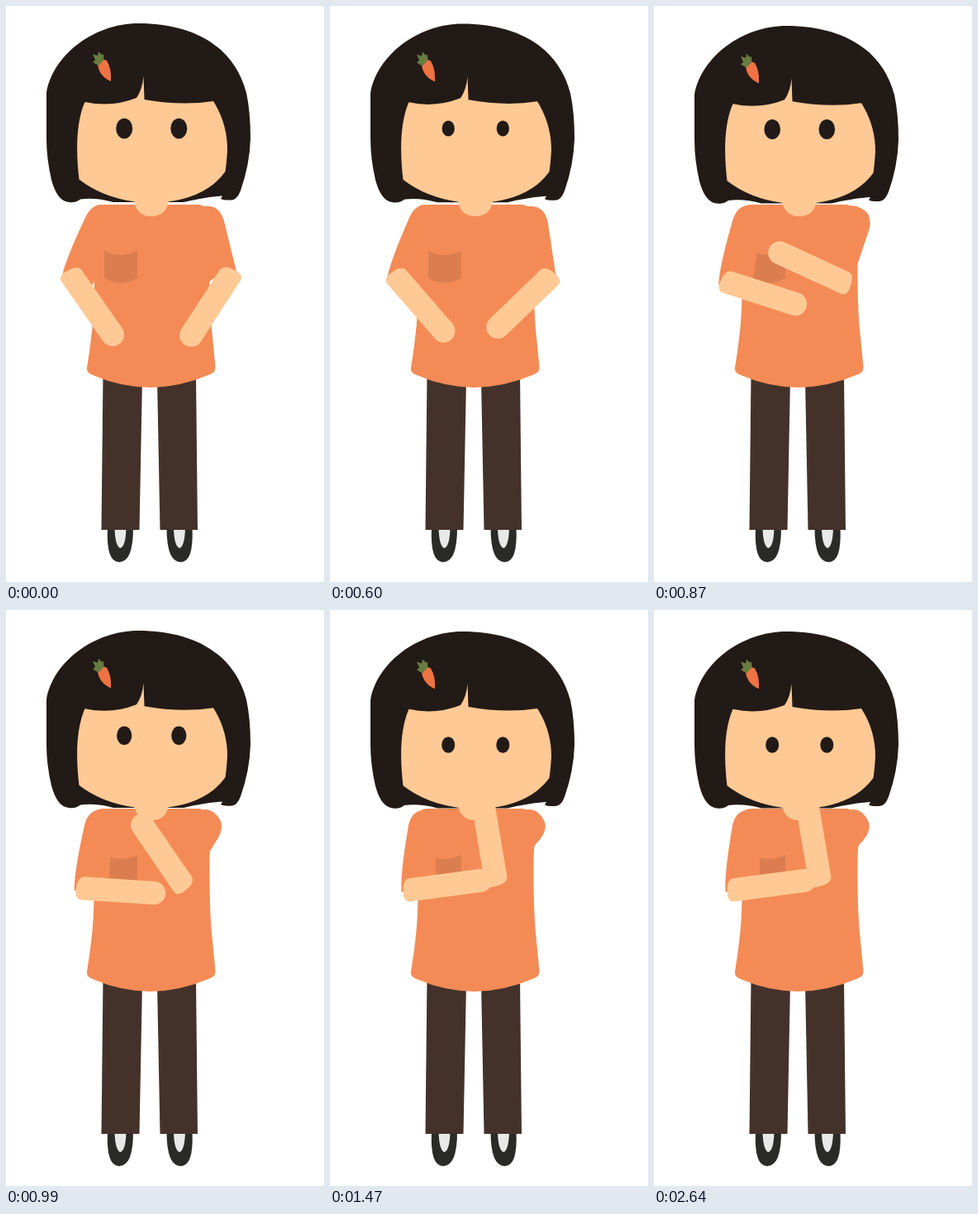
Animation of 385x696 px, one loop 4500 ms. Source, as an HTML page:

```html
<!DOCTYPE html>
<html lang="en">
<head>
<meta charset="utf-8">
<title>Thinking girl</title>
<style>
  html, body { margin: 0; width: 100%; height: 100%; overflow: hidden; background: #fff; }
  svg { display: block; width: 100%; height: 100%; }
  .hair { fill: #221a16; }
  .skin { fill: #ffc995; }
  .shirt { fill: #f48b56; }
  .pants { fill: #44322a; }
  .shoe { fill: #2a2a29; }
  .sock { fill: #e8e8e8; }
  .pocket { fill: #da7e50; }
  .carrot { fill: #ef7342; }
  .leaf { fill: #677c40; }
</style>
</head>
<body>
<svg viewBox="0 0 385 696" xmlns="http://www.w3.org/2000/svg">
  <defs>
    <path id="forearm" d="M-4-14Q-10-13-12-4L-13 6Q-12 14-6 14H82A14 14 0 0 0 82-14Z"/>
    <g id="shoe">
      <path class="shoe" d="M123 630Q121 672 137 672Q154 672 154 630Z"/>
      <path class="sock" d="M131.500 630H145.500Q145 654 138 655Q132 652 131.500 630Z"/>
    </g>
  </defs>

  <use href="#shoe"/>
  <use href="#shoe" transform="matrix(-1 0 0 1 348.500 0)"/>
  <path class="pants" d="M117.500 445L115.500 633H161.500L165 450ZM183 450L186.500 633H232L230 445Z"/>

  <g id="head">
    <path class="hair" d="M49 105C57 58 108 21 160 21C226 21 276 48 291 105Q296 128 296 160Q295 192 284 223Q280 234 273 234.500Q264 235 260 233L262 229.500Q240 231 215 237H130Q108 231 90 233.500Q85 238 76 237Q62 236 55 210Q49 184 49 160Z"/>
    <path class="skin" d="M95.500 116Q128 123 158 111Q165 101 166.500 85L167.500 113Q212 121 251 115Q268 142 268 174Q267 190 265.500 200Q244 230 196 236.500H156Q116 231 88.500 209.500C85 180 84 142 95.500 116Z"/>
    <path class="carrot" d="M111 71Q114 62 122 66Q128 76 127 91Q113 85 111 71Z"/>
    <path class="leaf" d="M112 72L105 68L108 65L105 58L111 60L112 55L116 59L118 58L118.500 65Z"/>
  </g>
  <ellipse id="eyeL" class="hair" rx="10" ry="12.300"/>
  <ellipse id="eyeR" class="hair" rx="10" ry="12.300"/>

  <path class="shirt" d="M111 241Q115 239.500 125 240H234L242 243L252 255Q247 280 246.500 300Q246 350 248.500 385L253.500 436Q254 443 246 445.500Q175 476 105 446Q97 443 98 437Q104 400 105.500 375L107 340L106 260Z"/>
  <path class="pocket" d="M119 295.500Q139 306 159 295.500V329Q139 340 119 329Z"/>
  <path class="skin" d="M155 234Q157 254 176 254Q195 254 197 234Z"/>

  <path id="sleeveR" class="shirt" d="M224 256Q227 243 241 242Q260 240 265 264L282.500 335L262 322L246 333L238 285Z"/>
  <path id="sleeveL" class="shirt" d="M116 240Q102 240 94.500 259Q77 296 70 318L67 329L105 337L112 322L118 301L124 260Z"/>
  <use id="armL" class="skin" href="#forearm"/>
  <use id="armR" class="skin" href="#forearm"/>
</svg>
<script>
  const LOOP = 4500, STEP = 30;
  const $ = id => document.getElementById(id);
  const set = (id, transform) => $(id).setAttribute('transform', transform);

  // Sine ease from 0 to 1 between two times
  const ease = (t, from, to) => {
    const x = Math.min(1, Math.max(0, (t - from) / (to - from)));
    return (1 - Math.cos(Math.PI * x)) / 2;
  };
  const dip = (t, at) => ease(t, at, at + 90) - ease(t, at + 90, at + 180);
  const blink = t => [300, 570, 2190, 2460].reduce((s, at) => s - 0.95 * dip(t, at), 1);

  const LEFT = { x: 120, y: 264, r: 76, from: 120, turn: -15.6, hand: 55, swing: -62.6, flip: 1 };
  const RIGHT = { x: 242, y: 259, r: 75, from: 69, turn: 55, hand: 123, swing: 137.4, flip: -1 };

  function poseArm(side, a, p) {
    const turn = a.turn * p, angle = (a.from + turn) * Math.PI / 180;
    const x = a.x + a.r * Math.cos(angle), y = a.y + a.r * Math.sin(angle);
    set('sleeve' + side, `rotate(${turn} ${a.x} ${a.y})`);
    set('arm' + side, `translate(${x} ${y}) rotate(${a.hand + a.swing * p}) scale(1 ${a.flip})`);
  }

  function draw(t) {
    const p = ease(t, 450, 1200);
    poseArm('L', LEFT, p);
    poseArm('R', RIGHT, p);
    set('head', `matrix(1 0 0 ${1 - 0.0115 * p} 0 ${5.2 * p})`);

    const y = 148 + 15 * ease(t, 750, 1470);
    const size = blink(t) * (1 - 0.2 * ease(t, 780, 1230));
    set('eyeL', `translate(143.2 ${y}) scale(${size})`);
    set('eyeR', `translate(209.3 ${y}) scale(${size})`);
  }

  const start = performance.now();
  function tick() {
    const t = (performance.now() - start) % LOOP;
    draw(Math.floor(t / STEP) * STEP);
    requestAnimationFrame(tick);
  }
  tick();
</script>
</body>
</html>
```
